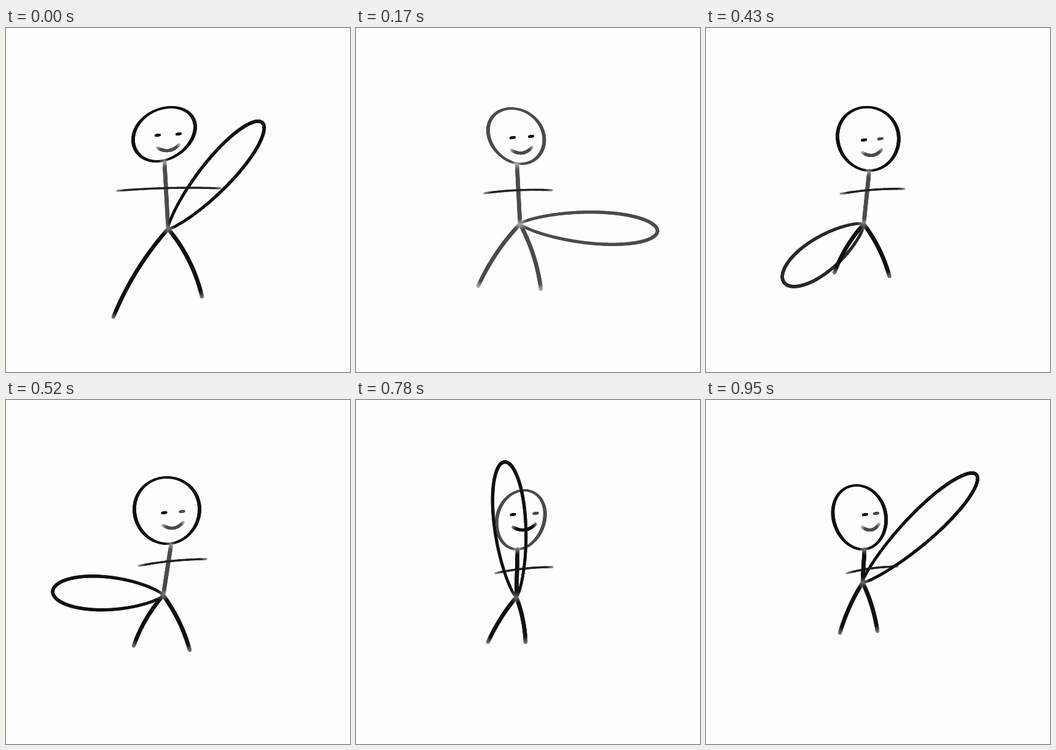
Recreate the animation shown at these times as an HTML page with a canvas. Size 560x560 px, loop 0.99 s.

```html
<!DOCTYPE html>
<html lang="en">
<head>
<meta charset="utf-8">
<title>Stick figure swing</title>
<style>
html, body { margin: 0; width: 100%; height: 100%; overflow: hidden; background: #fdfdfd; }
canvas { display: block; width: 560px; height: 560px; }
</style>
</head>
<body>
<canvas id="stage" width="560" height="560"></canvas>
<script>
const ctx = document.getElementById('stage').getContext('2d');
const LOOP = 990, STEPS = 23;
const DARK = 16, SOFT = 75;
const TURN = Math.PI * 2;
const poses = [];

// hip, neck: joints; head: centre, radii, lean; bat: degrees, length;
// arm, feet: left and right ends; eyes: midpoint, gap; soft: lightly drawn parts.
const pose = (step, parts, ...soft) => poses.push({ step, soft, ...parts });

pose(0, {
  hip: [264, 327], neck: [258], head: [257, 173, 49, 44, -12], bat: [-48.5, 231],
  arm: [181, 265, 349, 261], feet: [175, 470, 319, 437], eyes: [264, 174, 34]
}, 'neck', 'mouth');

pose(4, {
  hip: [267, 319], neck: [262], head: [261, 176, 45, 45, 8], bat: [3, 224],
  arm: [209, 269, 319, 264], feet: [199, 420, 301, 425], eyes: [270, 178, 30]
}, 'head', 'bat', 'neck', 'left', 'right', 'mouth');

pose(7, {
  hip: [258, 321], neck: [261], head: [267, 181, 45, 48, 5], bat: [86.5, 112],
  arm: [224, 270, 318, 266], feet: [211, 395, 298, 400], eyes: [268, 180, 23]
}, 'bat', 'neck', 'wink', 'mouth');

pose(12, {
  hip: [256, 318], neck: [269], head: [262, 180, 53, 54, 0], bat: [182, 180],
  arm: [216, 270, 326, 259], feet: [208, 400, 299, 407], eyes: [272, 183, 29]
}, 'neck', 'wink', 'mouth');

pose(15, {
  hip: [253, 328], neck: [270], head: [258, 185, 50, 56, 5], bat: [230.5, 214],
  arm: [226, 275, 332, 260], feet: [208, 401, 288, 397], eyes: [271, 185, 27]
}, 'left', 'wink');

pose(18, {
  hip: [261, 321], neck: [263], head: [268, 195, 39, 48, -6], bat: [265, 221],
  arm: [227, 282, 320, 272], feet: [215, 394, 276, 394], eyes: [274, 186, 37]
}, 'head', 'wink');

pose(22, {
  hip: [255, 297], neck: [258], head: [250, 191, 43, 52, 5], bat: [316.5, 255],
  arm: [229, 282, 312, 271], feet: [218, 379, 279, 376], eyes: [268, 186, 18]
}, 'wink', 'mouth');

const lerp = (a, b, t) => a + (b - a) * t;

const sample = (count, point) =>
  Array.from({ length: count + 1 }, (_, i) => point(i / count));

// Line from a to b, bowed sideways at its middle.
function arc([ax, ay], [bx, by], bow = 0) {
  const length = Math.hypot(bx - ax, by - ay);
  const nx = (ay - by) / length, ny = (bx - ax) / length;
  return sample(60, s => {
    const off = 4 * bow * s * (1 - s);
    return [lerp(ax, bx, s) + nx * off, lerp(ay, by, s) + ny * off];
  });
}

// Egg-shaped loop that starts and ends at the neck.
function headLoop([cx, cy, rx, ry, lean], neckX) {
  const from = Math.acos(Math.max(-1, Math.min(1, (neckX - cx - lean) / rx)));
  return sample(160, s => {
    const c = Math.cos(from + TURN * s), v = Math.sin(from + TURN * s);
    return [cx + rx * c * (1 - 0.04 * v) + lean * v, cy + ry * v];
  });
}

// Teardrop with its point at the hip; it looks broader when foreshortened.
function batLoop([x, y], degrees, length) {
  const angle = degrees * TURN / 360;
  const c = Math.cos(angle), s = Math.sin(angle);
  const halfWidth = 23 + 1560 / length;
  return sample(200, k => {
    const along = (1 - Math.cos(TURN * k)) / 2;
    const side = -halfWidth * Math.sin(TURN * k) * along ** 0.25;
    return [x + along * length * c - side * s, y + along * length * s + side * c];
  });
}

// Pencil line: the ends fade, the width follows a profile along the line.
function pencil(path, width, tone, fade = 12, profile = () => 1) {
  const last = path.length - 1;
  for (let i = 0; i < last; i++) {
    const [x, y] = path[i];
    const edge = Math.min(...[path[0], path[last]].map(([ex, ey]) => Math.hypot(x - ex, y - ey)));
    const grey = Math.round(tone + (fade ? 120 * Math.max(0, 1 - edge / fade) : 0));
    ctx.strokeStyle = `rgb(${grey},${grey},${grey})`;
    ctx.lineWidth = width * profile(i / last);
    ctx.beginPath();
    ctx.moveTo(x, y);
    ctx.lineTo(...path[i + 1]);
    ctx.stroke();
  }
}

const headProfile = s => 0.95 - 0.2 * Math.cos(2 * TURN * s);
const batProfile = s => 0.85 + 0.25 * Math.sin(Math.PI * s);

function draw(step) {
  const next = Math.max(1, poses.findIndex(p => p.step >= step));
  const a = poses[next - 1], b = poses[next];
  const t = (step - a.step) / (b.step - a.step);
  const part = name => a[name].map((v, i) => lerp(v, b[name][i], t));
  const shade = (p, name) => p.soft.includes(name) ? SOFT : DARK;
  const tone = name => lerp(shade(a, name), shade(b, name), t);

  ctx.globalCompositeOperation = 'source-over';
  ctx.fillStyle = '#fdfdfd';
  ctx.fillRect(0, 0, 560, 560);
  ctx.globalCompositeOperation = 'darken';
  ctx.lineCap = 'round';

  const hip = part('hip'), head = part('head');
  const [neckX] = part('neck');
  const [degrees, reach] = part('bat');
  const [ax, ay, bx, by] = part('arm');
  const [lx, ly, rx, ry] = part('feet');
  const [ex, ey, gap] = part('eyes');

  const swing = 1 + 0.055 * Math.sin(Math.PI * t);
  pencil(batLoop(hip, degrees, reach * swing), 5, tone('bat'), 14, batProfile);
  pencil(headLoop(head, neckX), 5, tone('head'), 10, headProfile);
  pencil(arc([neckX, head[1] + head[3]], hip), 6.5, tone('neck'));
  pencil(arc([ax, ay], [bx, by], -2.5), 3.3, 35);

  const bow = (rx - lx) * 0.05;
  pencil(arc(hip, [lx, ly], bow), 6.3, tone('left'));
  pencil(arc(hip, [rx, ry], -bow), 6.5, tone('right'));

  const eye = (x, y, name) => pencil(arc([x - 3, y], [x + 3, y - 1]), 4, tone(name), 0);
  eye(ex - gap / 2, ey + 1, 'open');
  eye(ex + gap / 2, ey - 1, 'wink');

  const smile = 9 + gap / 4;
  pencil(arc([ex - smile, ey + 21], [ex + smile, ey + 16], 7), 5, tone('mouth'), 7);
}

// Steps of 43⅓ ms, kept to whole hundredths of a second.
function stepAt(time) {
  let step = 0;
  while (step < STEPS - 1 && time >= 10 * Math.round((step + 1) * 13 / 3)) step++;
  return step;
}

let shown = -1;
const start = performance.now();
function tick() {
  const step = stepAt((performance.now() - start) % LOOP);
  if (step !== shown) draw(shown = step);
  requestAnimationFrame(tick);
}
tick();
</script>
</body>
</html>
```
